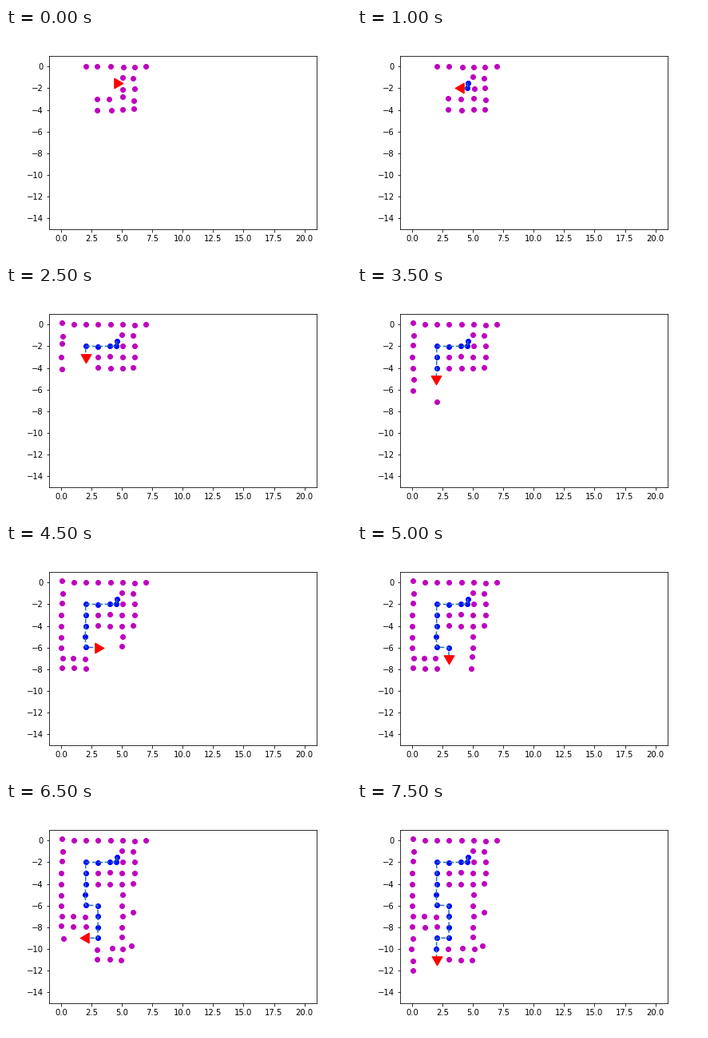
These frames come from a looping animation (432 by 288 pixels, 8000 ms). A matplotlib script:

```python
import math
import random

import matplotlib.pyplot as plt
from matplotlib.animation import FuncAnimation

STEP_MS = 500
SENSOR_RANGE = 3.01
SENSOR_NOISE = 0.08
DRIFT = 0.015

START = (4.55, -1.55)
LEFT, RIGHT, DOWN = (-1, 0), (1, 0), (0, -1)
MOVES = ([(0, -0.45), (-0.55, 0)] + [LEFT] * 2 + [DOWN] * 4
         + [RIGHT] + [DOWN] * 3 + [LEFT] + [DOWN] * 2)

# Blocks of unit-spaced wall points: (left, right, bottom, top)
BLOCKS = [
    (0, 7, 0, 0),
    (0, 0, -12, -1),
    (5, 5, -11, -1),
    (6, 6, -4, -1),
    (3, 4, -4, -3),
    (1, 2, -8, -7),
    (3, 4, -11, -10),
]
LOOSE_POINTS = [(5.95, -6.75), (5.8, -9.85)]


def build_walls():
    cells = [(x, y) for left, right, bottom, top in BLOCKS
             for x in range(left, right + 1)
             for y in range(bottom, top + 1)]
    return cells + LOOSE_POINTS


def build_route():
    pts, angles = [START], [-90]
    for dx, dy in MOVES:
        x, y = pts[-1]
        pts.append((x + dx, y + dy))
        angles.append(math.degrees(math.atan2(dy, dx)) - 90)
    return pts, angles


def jitter(point, size, rng):
    return tuple(v + rng.gauss(0, size) for v in point)


def mean(points):
    return tuple(sum(axis) / len(points) for axis in zip(*points))


def landmarks_at(step):
    """Average all noisy readings taken from the poses already left."""
    rng = random.Random(4)
    readings = {}
    for pose in route[:max(step, 1)]:
        for wall in walls:
            if math.dist(pose, wall) <= SENSOR_RANGE:
                seen = jitter(wall, SENSOR_NOISE, rng)
                readings.setdefault(wall, []).append(seen)
    return [mean(seen) for seen in readings.values()]


walls = build_walls()
route, headings = build_route()
drift_rng = random.Random(1)
poses = [jitter(p, DRIFT, drift_rng) for p in route]

fig, ax = plt.subplots(figsize=(6, 4), dpi=72)
fig.subplots_adjust(left=0.125, right=0.9, bottom=0.125, top=0.88)
ax.set_xlim(-1, 21)
ax.set_ylim(-15, 1)

landmarks, = ax.plot([], [], "mo")
visited, = ax.plot([], [], "bo")
trail, = ax.plot([], [], "--", color="C0")
robot, = ax.plot([], [], "r", linestyle="none", markersize=15)


def set_points(line, pts):
    line.set_data([p[0] for p in pts], [p[1] for p in pts])


def update(step):
    set_points(landmarks, landmarks_at(step))
    set_points(visited, poses[:step])
    set_points(trail, poses[:step + 1])
    set_points(robot, [poses[step]])
    robot.set_marker((3, 0, headings[step]))
    return landmarks, visited, trail, robot


anim = FuncAnimation(fig, update, frames=len(route), interval=STEP_MS,
                     repeat=True, repeat_delay=0)
plt.show()
```
